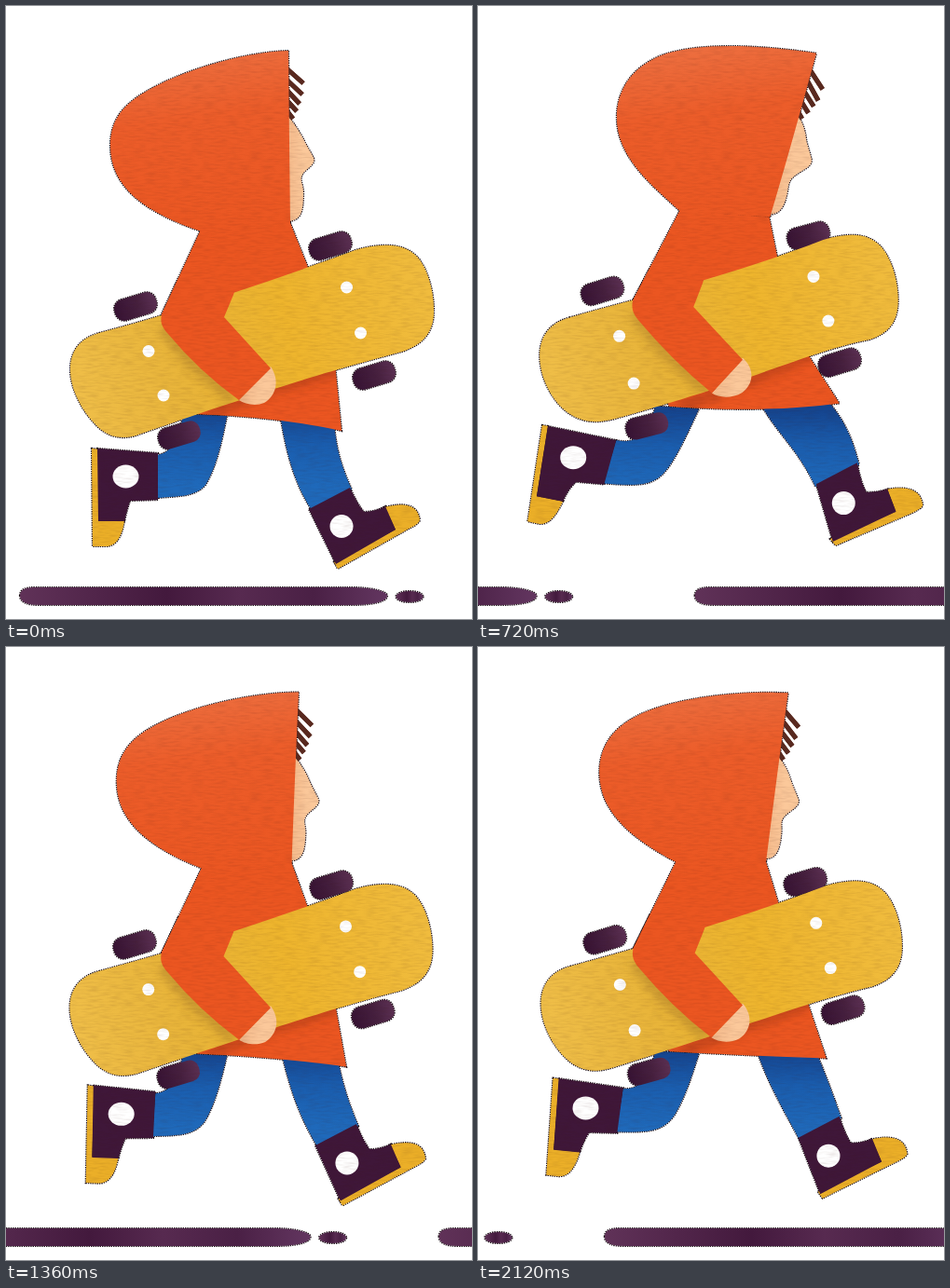
An HTML page for the animation above (2240 ms loop, 500x658 px).

```html
<!DOCTYPE html>
<html lang="en">
<head>
<meta charset="utf-8">
<title>Skater on the run</title>
<style>
  html, body { margin: 0; width: 100%; height: 100%; overflow: hidden; background: #fff; }
  svg { display: block; width: 100vw; height: 100vh; }
  .rim { stroke: #1c0f16; stroke-width: 2.2; stroke-dasharray: 1.4 1; }
  .jacket { fill: url(#orange); }
  .leg { fill: url(#blue); }
  .shoe { fill: #3f1739; }
  .sole { fill: #ebaf28; }
  .wheel { fill: url(#plum); }
  .skin { fill: url(#peach); }
  .dot { fill: #fff; stroke: none; }
  .hair { fill: none; stroke: #5a2a20; stroke-width: 5; stroke-dasharray: none; }
  .shade { fill: none; stroke-dasharray: none; filter: url(#soft); }
  .ground { fill: url(#road); paint-order: stroke; }
</style>
</head>
<body>
<svg viewBox="0 0 500 658" preserveAspectRatio="none">
  <defs>
    <linearGradient id="orange" gradientUnits="userSpaceOnUse" x1="215" y1="45" x2="245" y2="250">
      <stop offset="0" stop-color="#ed6f40"/>
      <stop offset=".35" stop-color="#ec5d2a"/>
      <stop offset="1" stop-color="#eb5621"/>
    </linearGradient>
    <linearGradient id="gold" gradientUnits="userSpaceOnUse" x1="70" y1="390" x2="455" y2="300">
      <stop offset="0" stop-color="#efbe48"/>
      <stop offset=".3" stop-color="#e8b439"/>
      <stop offset=".6" stop-color="#eeb52d"/>
      <stop offset="1" stop-color="#f0bc3e"/>
    </linearGradient>
    <linearGradient id="blue" gradientUnits="userSpaceOnUse" x1="0" y1="435" x2="0" y2="515">
      <stop offset="0" stop-color="#15458f"/>
      <stop offset=".45" stop-color="#1a5dae"/>
      <stop offset="1" stop-color="#1f69ba"/>
    </linearGradient>
    <linearGradient id="plum">
      <stop offset="0" stop-color="#371334"/>
      <stop offset=".55" stop-color="#46203f"/>
      <stop offset="1" stop-color="#5b3053"/>
    </linearGradient>
    <linearGradient id="road">
      <stop offset="0" stop-color="#603258"/>
      <stop offset=".4" stop-color="#43193d"/>
      <stop offset=".6" stop-color="#572a50"/>
      <stop offset=".8" stop-color="#4a2045"/>
      <stop offset="1" stop-color="#633660"/>
    </linearGradient>
    <linearGradient id="peach">
      <stop offset="0" stop-color="#f4b98a"/>
      <stop offset=".6" stop-color="#fbc89a"/>
    </linearGradient>
    <filter id="soft" x="-30%" y="-30%" width="160%" height="160%"><feGaussianBlur stdDeviation="4"/></filter>
    <filter id="grain" filterUnits="userSpaceOnUse" x="0" y="0" width="500" height="658" color-interpolation-filters="sRGB">
      <feTurbulence type="fractalNoise" baseFrequency=".08 .5" numOctaves="2" seed="4"/>
      <feColorMatrix values="0 0 0 0 .25  0 0 0 0 .08  0 0 0 0 .05  0 0 0 .22 -.09"/>
      <feComposite in2="SourceGraphic" operator="in" result="brush"/>
      <feMerge><feMergeNode in="SourceGraphic"/><feMergeNode in="brush"/></feMerge>
    </filter>
    <clipPath id="onBoard"><use href="#board"/></clipPath>
    <clipPath id="onJacket"><use href="#body"/></clipPath>
    <g id="strip">
      <path d="M0 633C0 626 6 624 18 624H354C376 624 394 628 394 633C394 640 376 643 354 643H22C8 643 0 640 0 633Z"/>
      <ellipse cx="418" cy="634" rx="14.5" ry="6"/>
    </g>
  </defs>

  <g class="ground rim">
    <use href="#strip"/><use href="#strip"/><use href="#strip"/>
  </g>

  <g filter="url(#grain)">
    <use href="#runner" class="rim"/>
    <g id="runner">
      <!-- back leg -->
      <path class="leg" d="M180 438L237 440C232 465 226 495 214 514C203 527 185 526 162 528L163 482C172 480 183 476 190 440Z"
        data-to="M180 428L237 432C228 450 216 475 206 490C190 514 178 515 132 511L147 465C165 468 175 468 190 432Z"/>
      <path class="sole" d="M92 475L99 476L99 552L127 552C124 573 116 580 107 580L93 580Z"
        data-to="M67 448L73 449L60 524L88 530C79 548 72 554 63 554L50 551Z"/>
      <path class="shoe" d="M98 475L163 480L163 530L133 531Q130 540 127 553L99 553Z"
        data-to="M73 449L147 465L133 512L103 509Q94 516 88 530L60 524Z"/>
      <ellipse class="dot" rx="14" ry="12.5" transform="translate(128.5 505)" data-to="translate(100 483)"/>

      <!-- front leg -->
      <path class="leg" d="M294 438C300 475 308 510 328 541L371 519C360 495 354 475 352 448Z"
        data-to="M305 428C325 460 348 475 365 514L412 490C405 460 395 440 377 422Z"/>
      <path class="sole" d="M352 597L418 562L406 538C426 533 442 534 444 552C442 556 438 558 434 560L356 604Z"
        data-to="M380 570L451 541L442 517C463 514 478 517 480 535C478 538 474 540 468 543L386 577Z"/>
      <path class="shoe" d="M325 540L369 517Q377 535 384 543Q396 543 407 537L418 562L354 599Z"
        data-to="M366 511L410 488Q413 508 419 520Q430 521 442 517L451 541L383 573Z"/>
      <circle class="dot" r="12.5" transform="translate(360 558.5)" data-to="translate(395 531.5)"/>

      <!-- head -->
      <path class="skin" d="M301 116Q314 132 321 147L330 163C332 169 326 172 320 178C313 186 319 190 319 200C319 222 316 230 303 231Z"
        data-to="M346 116Q354 128 355 145L360 164C361 171 355 174 348 178C334 186 335 190 333 200C329 217 324 223 313 223Z"/>
      <path class="hair" d="M301 67L319 83M301 79L318 95M301 90L315 105M301 101L312 113M301 112L308 121"
        data-to="M361 69L374 90M357 79L369 102M353 90L364 108M349 100L358 115M345 110L351 121"/>
      <path class="jacket" d="M303 48C250 50 185 71 150 92C120 109 112 128 112 150C112 195 150 222 210 242L305 234Q304 150 303 48Z"
        data-to="M368 51C320 43 245 34 200 50C165 64 152 91 152 117C152 160 190 190 218 219L314 226Q336 160 368 51Z"/>

      <!-- coat -->
      <path id="body" class="jacket" d="M209 240L167 331L205 438Q290 441 360 456L353 385L323 278L305 233Z"
        data-to="M217 218L166 315L205 429Q310 437 390 424L352 370L321 269L313 226Z"/>
      <g clip-path="url(#onJacket)">
        <path class="shade" stroke="#a93b17" stroke-width="14" opacity=".5" d="M215 438L290 409L358 389"
          data-to="M215 430L295 399L358 371"/>
      </g>

      <!-- board -->
      <rect class="wheel" x="-23" y="-11.5" width="46" height="23" rx="10" transform="translate(348 257.5) rotate(-17)" data-to="translate(355 245.5) rotate(-15)"/>
      <rect class="wheel" x="-23" y="-11.5" width="46" height="23" rx="10" transform="translate(139 322.5) rotate(-17)" data-to="translate(133 304.5) rotate(-17)"/>
      <rect class="wheel" x="-23" y="-11.5" width="46" height="23" rx="10" transform="translate(395 396.5) rotate(-17)" data-to="translate(387.5 381.5) rotate(-17)"/>
      <rect class="wheel" x="-23" y="-11.5" width="46" height="23" rx="10" transform="translate(186 460.5) rotate(-17)" data-to="translate(181 450) rotate(-14)"/>
      <path id="board" fill="url(#gold)" d="M100 351C190 327 280 297 375 262C400 255 425 253 441 269C452 281 459 305 459 327C459 350 448 363 425 371C365 387 300 405 145 459C128 466 110 465 95 448C80 432 69 410 69 390C69 372 78 357 100 351Z"
        data-to="M98 333C190 307 270 289 370 250C395 243 417 241 432 258C444 272 450 295 450 315C450 338 440 350 420 357C360 368 300 400 146 442C122 448 106 444 91 431C76 417 66 395 66 374C66 354 76 339 98 333Z"/>
      <g clip-path="url(#onBoard)">
        <path class="shade" stroke="#b0822a" stroke-width="15" opacity=".5" d="M169 345L200 382L245 422"
          data-to="M168 328L198 367L247 413"/>
      </g>
      <circle class="dot" r="6.5" transform="translate(153 370.5)" data-to="translate(151.5 353)"/>
      <circle class="dot" r="6.5" transform="translate(169 418)" data-to="translate(167 404)"/>
      <circle class="dot" r="6.5" transform="translate(365.5 302)" data-to="translate(359.5 289.5)"/>
      <circle class="dot" r="6.5" transform="translate(380.5 351)" data-to="translate(375.5 337)"/>

      <!-- arm -->
      <path class="skin" d="M250 423L284 387C294 402 290 418 277 426C267 430 256 427 250 423Z"
        data-to="M251 415L284 377C297 388 297 404 284 414C273 421 258 420 251 415Z"/>
      <path class="jacket" d="M185 292L167 331C165 340 168 345 173 351Q208 393 250 423L284 389L234 334L244 310L250 292Z"
        data-to="M184 281L166 315C164 324 167 330 172 336Q208 379 251 415L284 379L231 322L241 296L246 278Z"/>
    </g>
  </g>
</svg>
<script>
  const LOOP = 2240, STRIDE = 1200;
  const numbers = /-?\d+(\.\d+)?/g;

  const morphs = [...document.querySelectorAll('[data-to]')].map(el => {
    const attr = el.hasAttribute('d') ? 'd' : 'transform';
    const from = el.getAttribute(attr);
    const to = el.dataset.to.match(numbers).map(Number);
    return { el, attr, from, to };
  });
  const strips = document.querySelectorAll('.ground use');

  // Poses hold for 120 ms; the eighth of each second holds for 160 ms.
  function heldTime(t) {
    const second = Math.floor(t / 1000) * 1000;
    return second + Math.min(Math.floor((t - second) / 120), 7) * 120;
  }

  function pose(t) {
    const lift = 0.51 * (1 - Math.cos(2 * Math.PI * t / STRIDE));
    for (const { el, attr, from, to } of morphs) {
      let i = 0;
      el.setAttribute(attr, from.replace(numbers, n => (+n + (to[i++] - n) * lift).toFixed(2)));
    }
    const travel = 0.481 * Math.min(t, STRIDE) + 0.4325 * Math.max(t - STRIDE, 0);
    [15, 579, 1111].forEach((x, i) => strips[i].setAttribute('x', x - travel));
  }

  let shown = -1;
  function tick() {
    const t = heldTime(performance.now() % LOOP);
    if (t !== shown) pose(shown = t);
    requestAnimationFrame(tick);
  }
  tick();
</script>
</body>
</html>
```
